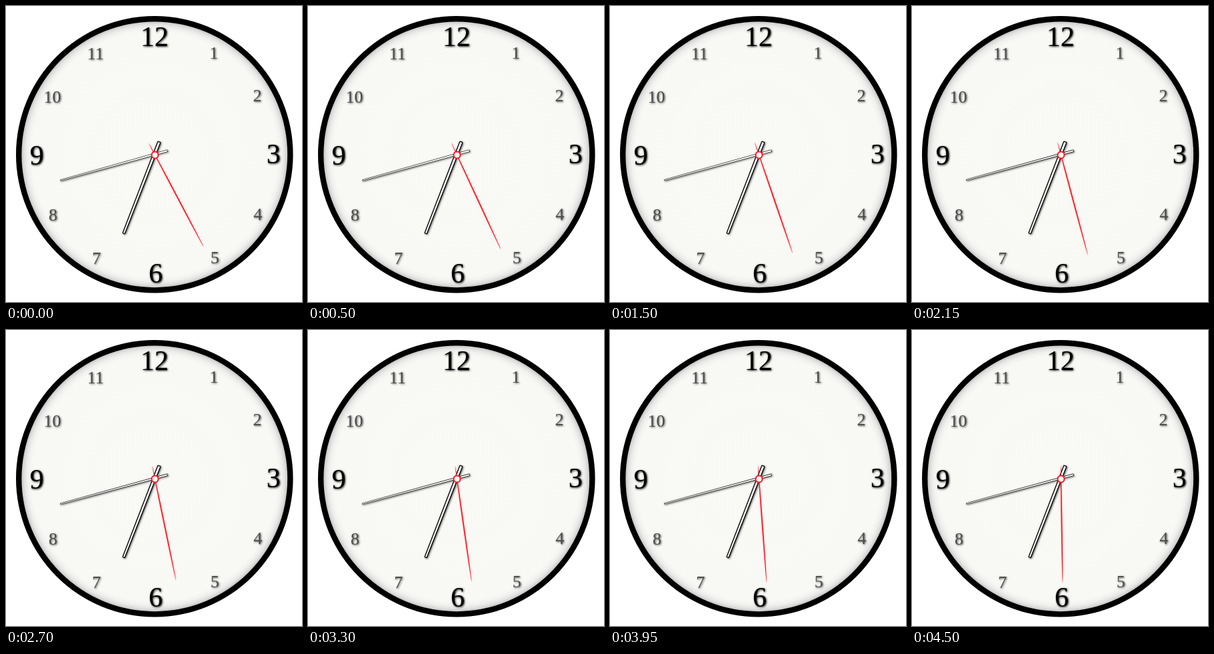
These frames come from a looping animation (444 px wide and 444 px high, 4.55 s). An HTML page with a canvas:

```html
<!DOCTYPE html>
<html>
<head>
<meta charset="utf-8">
<title>Clock</title>
<style>
html, body { margin: 0; width: 100%; height: 100%; overflow: hidden; background: #fff; }
canvas { display: block; }
</style>
</head>
<body>
<canvas id="clock" width="444" height="444"></canvas>
<script>
const ctx = document.getElementById('clock').getContext('2d');
const LOOP = 4550, STEP = 50;
const START = 6 * 3600 + 42 * 60 + 25.35; // time of day in seconds
const RED = '#fb1a22';
const TAU = Math.PI * 2;
const CENTER = 222.8, PIVOT = 223.5;

function shadow(color, blur, offset = 0) {
  ctx.shadowColor = color;
  ctx.shadowBlur = blur;
  ctx.shadowOffsetX = ctx.shadowOffsetY = offset;
}

function disc(center, r, fill) {
  ctx.beginPath();
  ctx.arc(center, center, r, 0, TAU);
  ctx.fillStyle = fill;
  ctx.fill();
}

function drawFace() {
  const inner = 199.4;
  disc(CENTER, 207.8, '#000');
  const shade = ctx.createRadialGradient(CENTER, CENTER, 0, CENTER, CENTER, inner);
  shade.addColorStop(0, '#f9f9f6');
  shade.addColorStop(0.925, '#f8f8f5');
  shade.addColorStop(0.955, '#f1f1ef');
  shade.addColorStop(0.98, '#e2e2e0');
  shade.addColorStop(1, '#c6c6c4');
  disc(CENTER, inner, shade);
}

function drawNumbers() {
  ctx.textAlign = 'center';
  ctx.textBaseline = 'alphabetic';
  for (let n = 1; n <= 12; n++) {
    const major = n % 3 === 0;
    const size = major ? 42 : 26;
    const a = n / 12 * TAU - 0.005;
    ctx.save();
    ctx.font = `${size}px "Liberation Serif", serif`;
    ctx.fillStyle = major ? '#000' : '#4c4c4c';
    shadow(major ? 'rgba(0,0,0,.95)' : 'rgba(0,0,0,.7)', 3, 1);
    ctx.fillText(n, 223.7 + 177.5 * Math.sin(a), 225.9 - 177.5 * Math.cos(a) + size * 0.27);
    ctx.restore();
  }
}

function atPivot(turn, draw) {
  ctx.save();
  ctx.translate(PIVOT, PIVOT);
  ctx.rotate(turn * TAU);
  draw();
  ctx.restore();
}

// White tapered blade with a black border, set slightly to one side of the pivot.
function drawBlade(turn, tail, tip, wide, narrow, border) {
  atPivot(turn, () => {
    ctx.translate(1.2, 0);
    ctx.beginPath();
    ctx.moveTo(-wide, tail);
    ctx.lineTo(wide, tail);
    ctx.lineTo(narrow, -tip);
    ctx.lineTo(-narrow, -tip);
    ctx.closePath();
    ctx.lineJoin = 'round';
    ctx.lineWidth = border * 2;
    ctx.strokeStyle = '#000';
    ctx.fillStyle = '#fff';
    shadow('rgba(0,0,0,.7)', 3, 1);
    ctx.stroke();
    shadow('transparent', 0);
    ctx.fill();
  });
}

function drawNeedle(turn, tail, tip, halfWidth) {
  atPivot(turn, () => {
    ctx.beginPath();
    ctx.ellipse(0, (tail - tip) / 2, halfWidth, (tail + tip) / 2, 0, 0, TAU);
    ctx.fillStyle = RED;
    shadow('rgba(255,0,0,.35)', 2);
    ctx.fill();
  });
}

function draw(ms) {
  const now = START + Math.floor(ms % LOOP / STEP) * STEP / 1000;
  const whole = Math.floor(now + 1e-6);
  ctx.fillStyle = '#fff';
  ctx.fillRect(0, 0, 444, 444);
  drawFace();
  drawNumbers();
  drawBlade(whole / 3600 % 1, 19.5, 146.5, 1.1, 0.4, 0.65);
  drawBlade(whole / 43200, 20, 126, 1.5, 1, 1.3);
  drawNeedle(now / 60 % 1, 20, 155.5, 0.9);
  disc(PIVOT, 6, RED);
  disc(PIVOT, 3.9, '#fff');
}

const begin = performance.now();
function frame() {
  draw(performance.now() - begin);
  requestAnimationFrame(frame);
}
frame();
</script>
</body>
</html>
```
